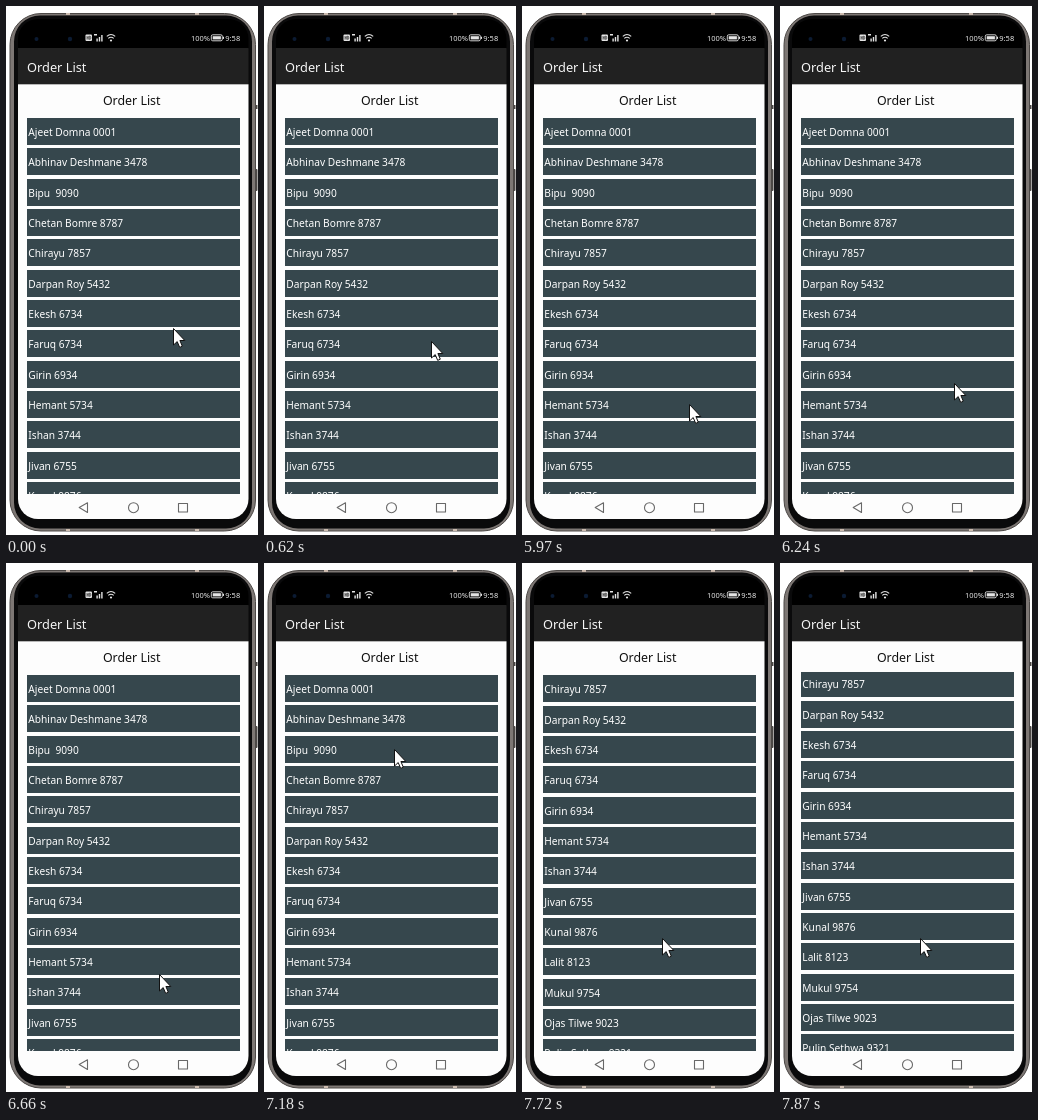
Animation, 252 px wide and 529 px high, one loop 7990 ms. Source, as an HTML page:

```html
<!DOCTYPE html>
<html lang="en">
<head>
<meta charset="utf-8">
<title>Order List</title>
<style>
html, body { margin: 0; width: 100%; height: 100%; overflow: hidden; background: #fff; }
svg { display: block; width: 252px; height: 529px; }
text { font-family: "Noto Sans", "Open Sans", sans-serif; font-weight: 500; white-space: pre; }
.row { font-size: 10.2px; fill: #fff; }
.status { font-size: 7.5px; fill: #e4e4e4; }
.head { font-size: 12.8px; fill: #f5f5f5; }
.title { font-size: 12.4px; fill: #111; text-anchor: middle; }
</style>
</head>
<body>
<svg viewBox="0 0 252 529">
  <defs>
    <clipPath id="screen"><rect x="12" y="13" width="230.5" height="500" rx="20"/></clipPath>
    <clipPath id="view"><rect x="12" y="109" width="230" height="379"/></clipPath>
  </defs>

  <!-- phone body -->
  <g fill="#4c4846">
    <rect x="249" y="99" width="2.5" height="4"/>
    <rect x="249" y="163" width="2.5" height="22" rx="1"/>
  </g>
  <rect x="4" y="7.5" width="245.5" height="517.5" rx="31" fill="#7d7774" stroke="#4c4846"/>
  <rect x="8" y="9.5" width="238" height="513" rx="26" fill="#0a0a0b"/>
  <g fill="#cdbcb0">
    <rect x="60" y="7" width="4" height="2"/><rect x="189" y="7" width="4" height="2"/>
    <rect x="60" y="523" width="4" height="2"/><rect x="189" y="523" width="4" height="2"/>
  </g>

  <g clip-path="url(#screen)">
    <rect x="12" y="12" width="232" height="31" fill="#000"/>
    <rect x="12" y="42" width="232" height="36.5" fill="#212121"/>
    <rect x="12" y="78.3" width="232" height="436" fill="#fdfdfd"/>
  </g>

  <!-- status bar -->
  <g fill="#0b1b33">
    <circle cx="30.5" cy="33" r="2"/><circle cx="64" cy="33" r="2.2"/>
  </g>
  <g fill="#e4e4e4">
    <rect x="79.5" y="28.5" width="6.5" height="6.5" rx="1"/>
    <path d="M81 30v3.6M82.3 30v3.6M81 31.8h1.3M83.6 30v3.6l1.2-.8v-2z" stroke="#111" stroke-width=".6" fill="none"/>
    <path d="M88 28h3v1.6h-3zM90.4 32.5h1.4v3h-1.4zM92.8 31h1.4v4.5h-1.4zM95.2 29h1.4v6.5h-1.4z"/>
    <path d="M100.8 30.4q4.2-3.8 8.4 0M102.3 32.4q2.7-2.4 5.4 0" fill="none" stroke="#e4e4e4" stroke-width="1.1"/>
    <circle cx="105" cy="34.5" r="1.1"/>
    <rect x="205.3" y="28.8" width="11" height="6" rx="1.4" fill="none" stroke="#e4e4e4" stroke-width=".9"/>
    <rect x="206.7" y="30.2" width="8.2" height="3.2"/>
    <rect x="217" y="30.7" width="1" height="2.2"/>
  </g>
  <text class="status" x="185" y="34.6">100%</text>
  <text class="status" x="219.3" y="34.6">9:58</text>

  <text class="head" x="21" y="65.8">Order List</text>
  <text class="title" x="125.7" y="98.8">Order List</text>

  <g clip-path="url(#view)"><g id="list"></g></g>

  <!-- navigation -->
  <g fill="none" stroke="#686868" stroke-width="1.1" stroke-linejoin="round">
    <path d="M81.5 496.8v9.6l-8.3-4.8z"/>
    <circle cx="127.5" cy="501.7" r="5"/>
    <rect x="172.5" y="497.5" width="9" height="8.5"/>
  </g>

  <path id="cursor" d="M.5.5V17L4.2 13.6 6.7 19.4 9.3 18.2 6.9 12.5H11.8Z"
    fill="#fff" stroke="#111" stroke-linejoin="round"/>
</svg>
<script>
const LOOP = 7990, TICK = 135, LAG = 15, PITCH = 30.33, TOP = 112;
const SCROLL_TICK = 57;
const orders = [
  "Ajeet Domna 0001", "Abhinav Deshmane 3478", "Bipu  9090", "Chetan Bomre 8787",
  "Chirayu 7857", "Darpan Roy 5432", "Ekesh 6734", "Faruq 6734", "Girin 6934",
  "Hemant 5734", "Ishan 3744", "Jivan 6755", "Kunal 9876", "Lalit 8123",
  "Mukul 9754", "Ojas Tilwe 9023", "Pulin Sethwa 9321"
];

// turning points of the cursor: tick, x, y
const path = [
  [3, 167, 322], [7, 165, 405], [43, 165, 405], [46, 174, 377], [48, 153, 411],
  [50, 153, 411], [51, 139, 291], [53, 130, 186], [55, 134, 294], [57, 140, 375]
];

const list = document.getElementById("list");
const cursor = document.getElementById("cursor");

function add(tag, attrs, text = "") {
  const el = document.createElementNS("http://www.w3.org/2000/svg", tag);
  for (const key in attrs) el.setAttribute(key, attrs[key]);
  el.textContent = text;
  list.append(el);
}

orders.forEach((order, i) => {
  const y = Math.round(TOP + i * PITCH);
  add("rect", { x: 21, y, width: 213, height: 27, fill: "#36474d" });
  add("text", { class: "row", x: 22.3, y: y + 17.8 }, order);
});

const moveTo = (el, x, y) => el.setAttribute("transform", `translate(${x} ${y})`);
const smooth = u => u * u * (3 - 2 * u);

function cursorAt(tick) {
  const next = path.findIndex(p => p[0] > tick);
  if (next === 0) return path[0].slice(1);
  if (next < 0) return path.at(-1).slice(1);
  const [t0, x0, y0] = path[next - 1], [t1, x1, y1] = path[next];
  const u = smooth((tick - t0) / (t1 - t0));
  return [x0 + (x1 - x0) * u, y0 + (y1 - y0) * u].map(Math.round);
}

// the screen refreshes in coarse ticks
function draw(time) {
  const tick = Math.floor((time % LOOP - LAG) / TICK);
  const past = tick - SCROLL_TICK;
  moveTo(list, 0, past < 0 ? 0 : -Math.round(4 * PITCH + 5 * past));
  moveTo(cursor, ...cursorAt(tick));
}

let start;
function frame(now) {
  start ??= now;
  draw(now - start);
  requestAnimationFrame(frame);
}
draw(0);
requestAnimationFrame(frame);
</script>
</body>
</html>
```
